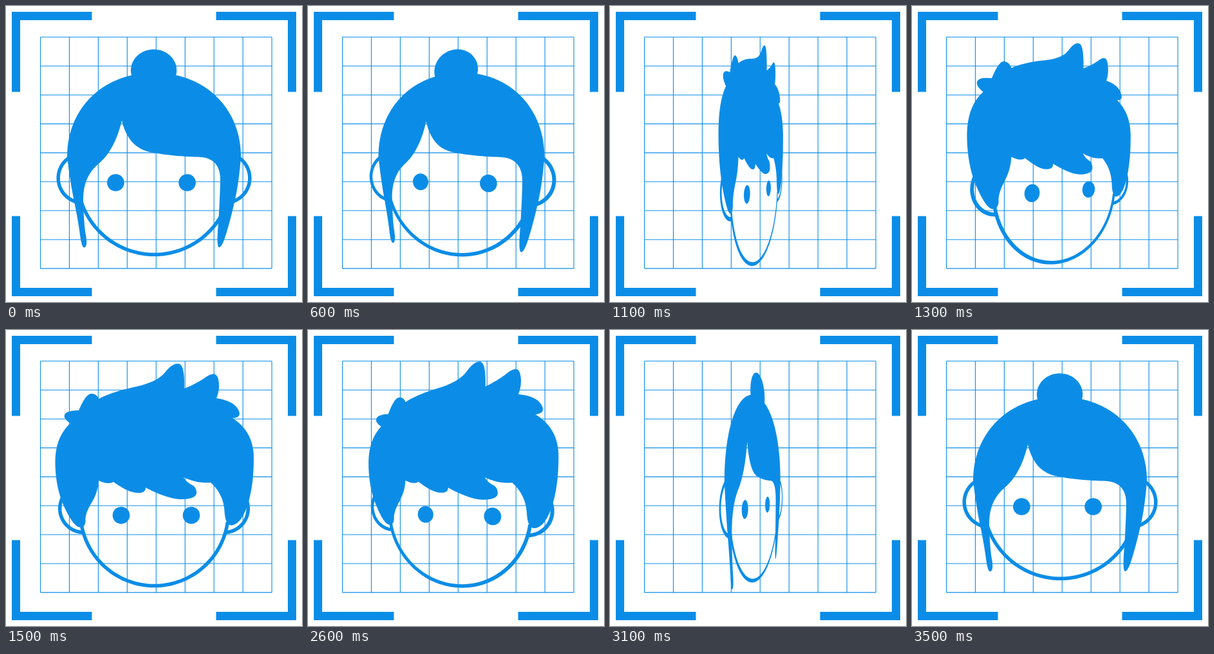
Write an HTML page with a canvas that moves like this. It is 460 px wide and 460 px high and loops after 4000 ms.

```html
<!DOCTYPE html>
<html lang="en">
<head>
<meta charset="utf-8">
<title>Face scan</title>
<style>
  html, body { margin: 0; width: 100%; height: 100%; overflow: hidden; background: #fff; }
  canvas { display: block; width: 460px; height: 460px; }
</style>
</head>
<body>
<canvas id="stage"></canvas>
<script>
const SIZE = 460, MID = 230, DEPTH = 640, BLUE = '#0b8de7';
const LOOP = 4000, STEP = 100, TURN = 500;

const canvas = document.getElementById('stage');
const ctx = canvas.getContext('2d');
const dpr = window.devicePixelRatio || 1;
canvas.width = canvas.height = SIZE * dpr;
ctx.scale(dpr, dpr);

const rad = deg => deg * Math.PI / 180;
const mix = (a, b, t) => [a[0] + (b[0] - a[0]) * t, a[1] + (b[1] - a[1]) * t];

// Points along an arc; power 1 gives an ellipse, less a fuller curve.
function sweep(x, y, rx, ry, from, to, power = 1) {
  const bend = v => Math.sign(v) * Math.abs(v) ** power;
  return Array.from({ length: 73 }, (_, k) => {
    const a = rad(from + (to - from) * k / 72);
    return [x + rx * bend(Math.cos(a)), y + ry * bend(Math.sin(a))];
  });
}

const disc = (x, y, rx, ry = rx) => sweep(x, y, rx, ry, 0, 360);

// A stroked arc as a filled band, so its weight follows the perspective.
function band(x, y, r, from, to, w = 5.5) {
  const o = r + w / 2, i = r - w / 2;
  return [...sweep(x, y, o, o, from, to), ...sweep(x, y, i, i, to, from)];
}

// Closed curve pulled towards its key points; "!" marks a sharp corner.
function spline(text) {
  const keys = text.trim().split(/\s+/).map(s => ({
    sharp: s[0] === '!',
    at: s.replace('!', '').split(',').map(Number)
  }));
  const n = keys.length;
  return keys.flatMap((key, i) => {
    if (key.sharp) return [key.at];
    const end = k => k.sharp ? k.at : mix(k.at, key.at, 0.5);
    const a = end(keys[(i + n - 1) % n]), b = end(keys[(i + 1) % n]);
    return Array.from({ length: 17 }, (_, k) => {
      const t = k / 16;
      return mix(mix(a, key.at, t), mix(key.at, b, t), t);
    });
  });
}

// Jaw line, ears and eyes; ears and eyes mirror about their own middle.
function features({ chin, jaw, ear, eye }) {
  return [
    band(MID + 0.5, chin - jaw, jaw, 8, 172),
    band(MID - ear.dx, ear.y, ear.r, 94, 234),
    band(MID + ear.dx, ear.y, ear.r, -54, 86),
    disc(eye.x - eye.dx, eye.y, 13.3),
    disc(eye.x + eye.dx, eye.y, 13.3)
  ];
}

const woman = [
  disc(229.6, 100, 35.6, 32.6),
  [
    ...sweep(MID, 235, 135, 131, 180, 360, 0.95),
    ...spline(`!365,235 362,275 348,335 336,374 327,376 332,310 334,235
      262,234 190,221 !180,178 169,224 119,266 121,340 127,372
      118,378 112,333 100,275 !95,235`)
  ],
  ...features({
    chin: 386.3, jaw: 119.5,
    ear: { dx: 110.5, y: 267.5, r: 38.3 },
    eye: { x: 226, dx: 55.6, y: 274.5 }
  })
];

const man = [
  spline(`76,167 !100,145 88,137 95,125 !113,125 124,99 141,99 !144,107
    165,96 235,81 259,51 278,54 !277,91 295,84 327,62 333,92 !327,106
    353,110 368,136 !352,137 385,158 385,240 368,297 341,308 338,255
    !318,237 298,239 !276,229 281,237 296,244 296,262 254,264
    !217,245 217,254 189,252 !167,236 159,241 !144,234
    143,252 123,285 124,306 106,307 77,247`),
  ...features({
    chin: 397.5, jaw: 115,
    ear: { dx: 109.3, y: 277.5, r: 37 },
    eye: { x: 233.5, dx: 54.5, y: 288 }
  })
];

function drawFrame() {
  const near = 9, far = SIZE - near, len = 124.5, w = 13;
  for (const a of [near, far - len]) {
    for (const b of [near, far - w]) {
      ctx.fillRect(a, b, len, w);
      ctx.fillRect(b, a, w, len);
    }
  }
}

function drawGrid() {
  const x = 53.5, y = 48.3, cell = 44.95, side = cell * 8;
  ctx.beginPath();
  for (let d = 0; d <= side; d += cell) {
    ctx.moveTo(x + d, y);
    ctx.lineTo(x + d, y + side);
    ctx.moveTo(x, y + d);
    ctx.lineTo(x + side, y + d);
  }
  ctx.lineWidth = 1.1;
  ctx.stroke();
}

// Turn a head about the vertical axis, seen in perspective.
function drawHead(parts, angle) {
  const c = Math.cos(angle), s = Math.sin(angle);
  if (c < 1e-6) return;
  for (const pts of parts) {
    ctx.beginPath();
    for (const [px, py] of pts) {
      const x = px - MID, k = DEPTH / (DEPTH - x * s);
      ctx.lineTo(MID + x * c * k, MID + (py - MID) * k);
    }
    ctx.closePath();
    ctx.fill();
  }
}

function draw(ms) {
  const t = Math.floor((ms % LOOP) / STEP) * STEP;
  const half = LOOP / 2, p = t % half;
  const swapped = p >= 2 * TURN;
  let deg = 0;
  if (p > TURN && p < 3 * TURN) deg = 90 * (p - TURN) / TURN - (swapped ? 180 : 0);

  ctx.fillStyle = '#fff';
  ctx.fillRect(0, 0, SIZE, SIZE);
  ctx.fillStyle = ctx.strokeStyle = BLUE;
  drawGrid();
  drawFrame();
  drawHead((t >= half) !== swapped ? man : woman, rad(deg));
}

const start = performance.now();
function tick() {
  draw(performance.now() - start);
  requestAnimationFrame(tick);
}
tick();
</script>
</body>
</html>
```
